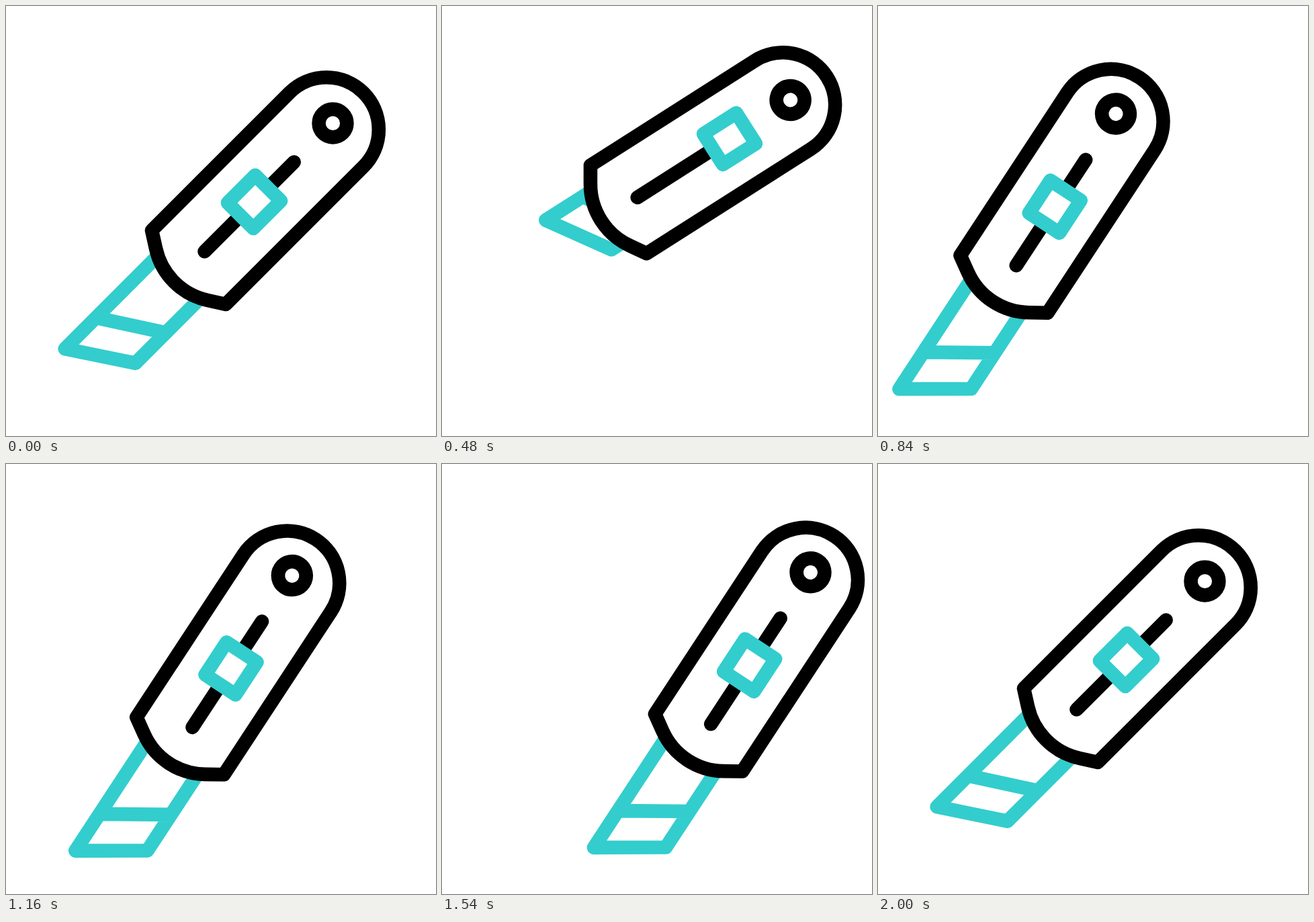
Recreate the animation shown at these times as an HTML page. Size 640 px wide and 640 px high, loop 2400 ms.

```html
<!DOCTYPE html>
<html>
<head>
<meta charset="utf-8">
<style>
html, body { margin: 0; width: 100%; height: 100%; overflow: hidden; background: #fff; }
svg { display: block; width: 100vw; height: 100vh; }
svg * { fill: #fff; stroke: #000; stroke-width: 20.6; stroke-linecap: round; stroke-linejoin: round; }
.teal * { stroke: #33cdcd; }
</style>
</head>
<body>
<svg viewBox="0 0 640 640">
  <!-- the knife lies along the x axis, blade to the left -->
  <g id="knife">
    <g id="blade" class="teal">
      <path d="M-60-44.7H-298.8L-239.7 44.7H-60M-233.3-44.7L-175.7 44.7"/>
    </g>
    <path d="M-82.7-77.8H207.2A77.8 77.8 0 0 1 207.2 77.8H-82.7L-97.6 54.4A101 101 0 0 1-97.6-54.4Z"/>
    <circle cx="220.6" r="20.9"/>
    <path d="M-49.5 0H138.9"/>
    <g id="slider" class="teal">
      <rect x="26.2" y="-27" width="58" height="54"/>
    </g>
  </g>
</svg>
<script>
const LOOP = 2400;
const [knife, blade, slider] = ['knife', 'blade', 'slider'].map(id => document.getElementById(id));

// eased progress between two times
function ease(t, from, to) {
  const x = Math.min(1, Math.max(0, (t - from) / (to - from)));
  return x * x * (3 - 2 * x);
}

// legs of the journey: start, end, path
const legs = [
  [0, 380, 'M320 320C328 281 369 237 336.5 239.4'],
  [400, 840, 'M336.5 239.4C319 245 225 320 220.5 336.7'],
  [840, 1640, 'M220.5 336.7Q322 349 423.5 336.5'],
  [1640, 2000, 'M423.5 336.5L320 320']
].map(([from, to, d]) => {
  const path = document.createElementNS('http://www.w3.org/2000/svg', 'path');
  path.setAttribute('d', d);
  return { from, to, path, length: path.getTotalLength() };
});

function place(t) {
  const leg = legs.findLast(l => t >= l.from);
  return leg.path.getPointAtLength(leg.length * ease(t, leg.from, leg.to));
}

function draw(t) {
  const { x, y } = place(t);
  const angle = 45 - 14.9 * ease(t, 0, 360) + 26.6 * ease(t, 400, 840) - 11.7 * ease(t, 1640, 2000);
  const slide = 63.7 * (ease(t, 0, 400) - ease(t, 400, 840));
  knife.setAttribute('transform', `translate(${x} ${y}) rotate(${-angle}) translate(0 14.85)`);
  slider.setAttribute('transform', `translate(${slide})`);
  blade.setAttribute('transform', `translate(${2 * slide})`);
}

const start = performance.now();
function tick() {
  draw((performance.now() - start) % LOOP);
  requestAnimationFrame(tick);
}
tick();
</script>
</body>
</html>
```
